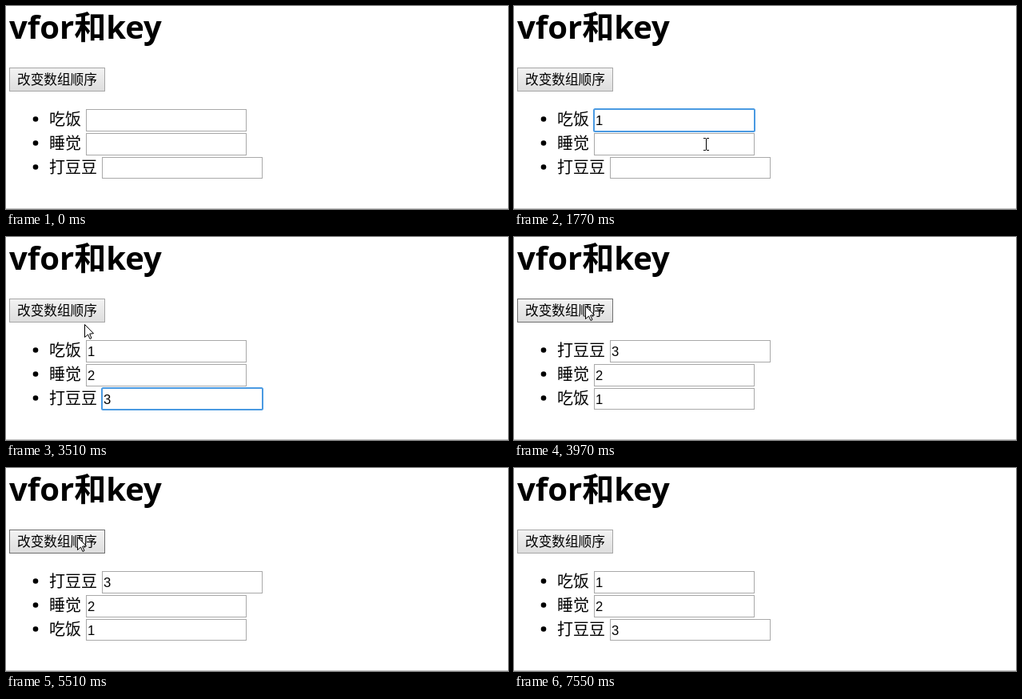
An HTML page with a canvas for the animation above (8.63 s loop, 628 by 254 pixels).

```html
<!DOCTYPE html>
<html lang="zh">
<head>
<meta charset="utf-8">
<title>vfor和key</title>
<style>
html, body { margin: 0; width: 100%; height: 100%; overflow: hidden; background: #fff; }
canvas { display: block; }
</style>
</head>
<body>
<canvas id="stage" width="628" height="254"></canvas>
<script>
const ctx = document.getElementById('stage').getContext('2d');
const LOOP = 8630;
const CJK = '"Noto Sans CJK SC", "Noto Sans CJK", sans-serif';
const BUTTON = { x: 4, y: 77, w: 120, h: 30 };

// Bursts of screen updates: start, end, count
const bursts = [
  [300, 1010, 10], [1240, 1770, 8], [2000, 2000, 1], [2170, 2720, 8], [2950, 3800, 12],
  [3890, 3970, 2], [4750, 4830, 2], [5440, 5510, 2], [6230, 6290, 2], [7000, 7550, 8]
];
const ticks = [0];
for (const [a, b, n] of bursts)
  for (let i = 0; i < n; i++)
    ticks.push(n > 1 ? Math.round((a + (b - a) * i / (n - 1)) / 10) * 10 : a);

// Pointer hotspot: time, x, y
const path = [
  [300, 463, 231], [540, 328, 168], [700, 268, 142], [860, 243, 131],
  [1320, 243, 131], [1770, 238, 172], [2250, 238, 172], [2480, 224, 214],
  [3030, 224, 214], [3490, 98, 109], [3800, 89, 86], [6920, 89, 86], [7470, 518, 240]
];
const presses = [
  [930, 1010], [2000, 2170], [2640, 2720],
  [3890, 3970], [4750, 4830], [5440, 5510], [6230, 6290]
];
const items = [
  { label: '吃饭', value: '1', focus: 930, typed: 1240, blur: 2000 },
  { label: '睡觉', value: '2', focus: 2000, typed: 2250, blur: 2640 },
  { label: '打豆豆', value: '3', focus: 2640, typed: 2950, blur: 3890 }
];

function pointerAt(t) {
  if (t < 300 || t >= 7550) return null;
  let i = 0;
  while (i < path.length - 2 && path[i + 1][0] <= t) i++;
  const [t0, x0, y0] = path[i], [t1, x1, y1] = path[i + 1];
  const k = Math.min(1, (t - t0) / (t1 - t0));
  return { x: Math.round(x0 + (x1 - x0) * k), y: Math.round(y0 + (y1 - y0) * k) };
}

function inside(p, r) {
  return p && p.x >= r.x && p.x < r.x + r.w && p.y >= r.y && p.y < r.y + r.h;
}

function text(str, x, y, font) {
  ctx.font = font;
  ctx.fillStyle = '#000';
  ctx.fillText(str, x, y);
}

function box(r, color) {
  ctx.strokeStyle = color;
  ctx.lineWidth = 1;
  ctx.strokeRect(r.x + 0.5, r.y + 0.5, r.w - 1, r.h - 1);
}

function drawButton(hover, active) {
  const { x, y, w, h } = BUTTON;
  const g = ctx.createLinearGradient(0, y, 0, y + h);
  g.addColorStop(0, active ? '#e2e2e2' : '#f3f3f3');
  g.addColorStop(1, active ? '#d6d6d6' : '#dddddd');
  ctx.fillStyle = g;
  ctx.fillRect(x, y, w, h);
  box(BUTTON, hover ? '#707070' : '#a6a6a6');
  text('改变数组顺序', 14, 98, '16.667px ' + CJK);
}

function fieldOf(item, row) {
  return { x: 60 + item.label.length * 20, y: 129 + row * 30, w: 201, h: row === 2 ? 27 : 28 };
}

function drawItem(item, row, t) {
  const f = fieldOf(item, row), base = 149 + row * 30;
  const typed = t >= item.typed;
  ctx.fillStyle = '#000';
  ctx.beginPath();
  ctx.arc(37, 141.5 + row * 30, 3.3, 0, 7);
  ctx.fill();
  text(item.label, 54, base, '20px ' + CJK);
  box(f, '#a9a9a9');
  if (typed) text(item.value, f.x + 2, base, '16.667px "Liberation Sans", Arial, sans-serif');
  if (t < item.focus || t >= item.blur) return;
  ctx.strokeStyle = '#4a9ae2';
  ctx.lineWidth = 2;
  ctx.beginPath();
  ctx.roundRect(f.x, f.y, f.w, f.h, 1.5);
  ctx.stroke();
  const since = t - (typed ? item.typed : item.focus);
  if (since % 1000 < 500) {
    ctx.fillStyle = '#000';
    ctx.fillRect(f.x + (typed ? 10 : 2), f.y + 5, typed ? 1 : 2, 19);
  }
}

function drawArrow({ x, y }) {
  const pts = [[0, 0], [0, 16], [4, 12.5], [6.5, 18], [8.5, 17], [6.2, 11.6], [11, 11.2]];
  ctx.beginPath();
  for (const [dx, dy] of pts) ctx.lineTo(x + dx + 0.5, y + dy + 0.5);
  ctx.closePath();
  ctx.fillStyle = '#fff';
  ctx.fill();
  ctx.strokeStyle = '#000';
  ctx.lineWidth = 1;
  ctx.stroke();
}

function drawBeam({ x, y }) {
  const cx = x + 2, top = y - 7;
  ctx.fillStyle = '#000';
  ctx.fillRect(cx, top + 1, 1, 14);
  for (const dy of [0, 15]) {
    ctx.fillRect(cx - 3, top + dy, 3, 1);
    ctx.fillRect(cx + 1, top + dy, 3, 1);
  }
}

function drawGlow({ x, y }) {
  ctx.globalCompositeOperation = 'multiply';
  ctx.fillStyle = '#fcf86c';
  ctx.beginPath();
  ctx.arc(x, y, 15, 0, 7);
  ctx.fill();
  ctx.globalCompositeOperation = 'source-over';
}

function draw(time) {
  const t = ticks.findLast(v => v <= time);
  const p = pointerAt(t);
  const down = presses.some(([a, b]) => t >= a && t < b);
  const hover = inside(p, BUTTON);
  const flips = presses.slice(3).filter(([, up]) => t >= up).length;
  const list = flips % 2 ? [...items].reverse() : items;

  ctx.fillStyle = '#fff';
  ctx.fillRect(0, 0, 628, 254);
  ctx.fillStyle = '#c3c3c3';
  ctx.fillRect(0, 253, 628, 1);
  text('vfor和key', 4, 41, 'bold 40px "Open Sans", "Noto Sans", ' + CJK);
  drawButton(hover, hover && down);
  list.forEach((item, row) => drawItem(item, row, t));

  if (!p) return;
  if (down) drawGlow(p);
  const overField = list.some((item, row) => inside(p, fieldOf(item, row)));
  (overField ? drawBeam : drawArrow)(p);
}

const start = performance.now();
function loop() {
  draw((performance.now() - start) % LOOP);
  requestAnimationFrame(loop);
}
loop();
</script>
</body>
</html>
```
